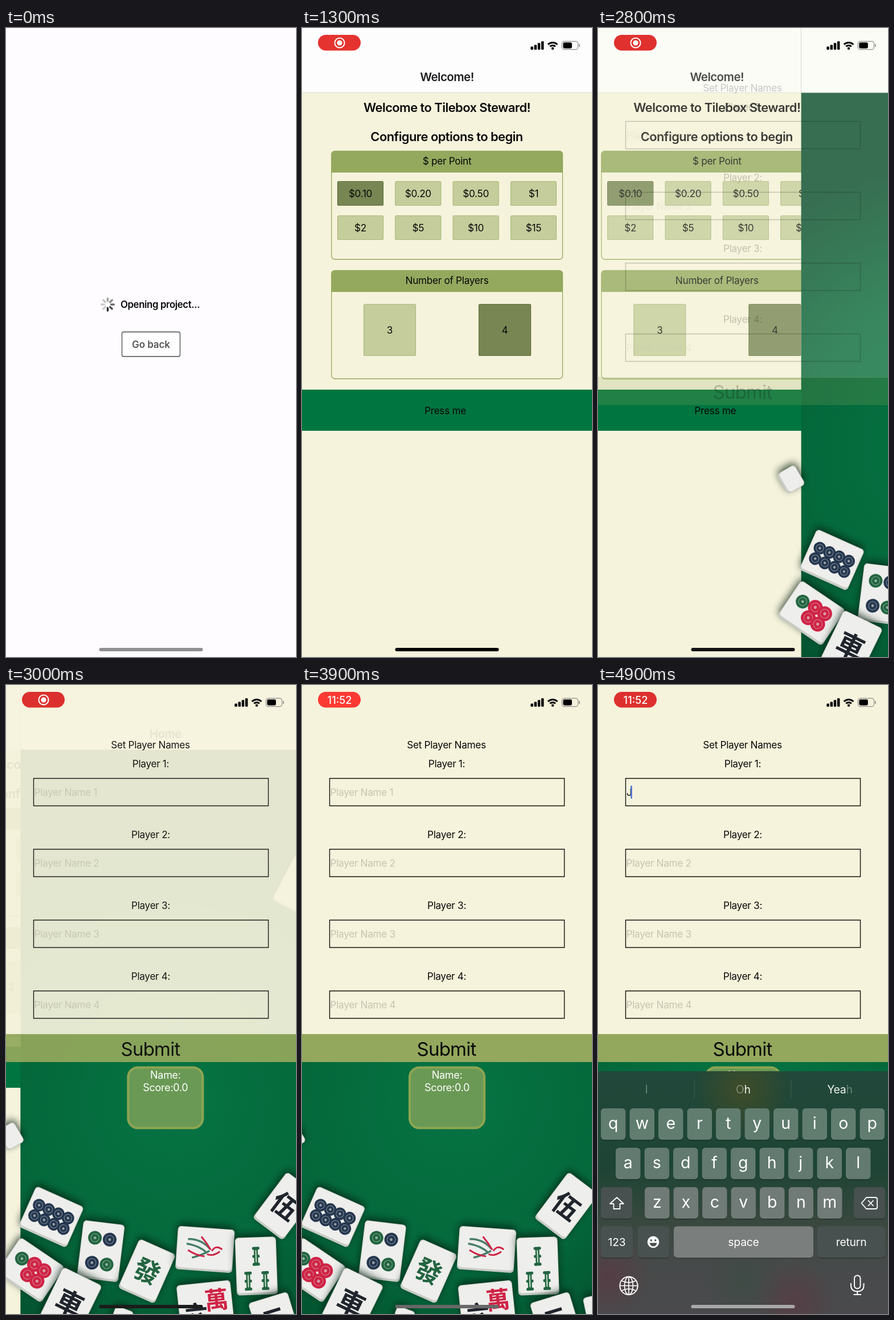
An HTML page with a canvas for the animation above (5000 ms loop, 509x1101 px).

```html
<!DOCTYPE html>
<html lang="en">
<head>
<meta charset="utf-8">
<title>Score keeper demo</title>
<style>
html, body { margin: 0; width: 100%; height: 100%; overflow: hidden; background: #fefcff; }
canvas { display: block; width: 509px; height: 1101px; }
</style>
</head>
<body>
<canvas id="stage"></canvas>
<script>
const W = 509, H = 1101, LOOP = 5000, STEP = 100;
const canvas = document.getElementById('stage');
const ctx = canvas.getContext('2d');
const ratio = window.devicePixelRatio || 1;
canvas.width = W * ratio;
canvas.height = H * ratio;

const CREAM = '#f6f3dc', OLIVE = '#94a95e', WHITE = '#fefdfe';
const AT = { app: 100, rate: 400, players: 1300, push: 2740, clock: 3500, keyboard: 3985, typed: 4850 };

const clamp = v => Math.max(0, Math.min(1, v));
const mix = (a, b, k) => a + (b - a) * k;

// Critically damped spring, 0 to 1
function spring(ms) {
  if (ms <= 0) return 0;
  const u = ms * 0.01826;
  return 1 - (1 + u) * Math.exp(-u);
}

// Linear interpolation through [time, value] points
function track(points, t) {
  for (let i = 1; i < points.length; i++) {
    const [t0, a] = points[i - 1], [t1, b] = points[i];
    if (t <= t1) return mix(a, b, clamp((t - t0) / (t1 - t0)));
  }
  return points[points.length - 1][1];
}

function box(x, y, w, h, r, fill, stroke, line = 1.3) {
  ctx.beginPath();
  ctx.roundRect(x, y, w, h, r);
  if (fill) { ctx.fillStyle = fill; ctx.fill(); }
  if (stroke) { ctx.strokeStyle = stroke; ctx.lineWidth = line; ctx.stroke(); }
}

function disc(x, y, r, fill) {
  ctx.beginPath();
  ctx.arc(x, y, r, 0, Math.PI * 2);
  ctx.fillStyle = fill;
  ctx.fill();
}

function ring(x, y, r, color, line) {
  ctx.beginPath();
  ctx.arc(x, y, r, 0, Math.PI * 2);
  ctx.strokeStyle = color;
  ctx.lineWidth = line;
  ctx.stroke();
}

function path(d, color, line) {
  const p = new Path2D(d);
  if (line) {
    ctx.strokeStyle = color;
    ctx.lineWidth = line;
    ctx.stroke(p);
  } else {
    ctx.fillStyle = color;
    ctx.fill(p);
  }
}

// y is the middle of the capital letters
function text(s, x, y, { size = 17.2, color = '#080808', weight = 400, align = 'center', gap = -0.3 } = {}) {
  ctx.font = `${weight} ${size}px Inter, sans-serif`;
  ctx.letterSpacing = gap + 'px';
  ctx.textAlign = align;
  ctx.fillStyle = color;
  ctx.fillText(s, x, y + size * 0.364);
}

function shifted(x, y, draw) {
  ctx.save();
  ctx.translate(x, y);
  draw();
  ctx.restore();
}

function loading(t) {
  ctx.fillStyle = '#fefcff';
  ctx.fillRect(0, 0, W, H);
  const lead = Math.floor(t / 125);
  ctx.lineCap = 'round';
  ctx.lineWidth = 3.4;
  for (let i = 0; i < 8; i++) {
    const a = Math.PI / 2 + (lead - i) * Math.PI / 4;
    const g = Math.min(200, 45 + i * 30);
    ctx.strokeStyle = `rgb(${g},${g},${g})`;
    ctx.beginPath();
    ctx.moveTo(178.5 + Math.cos(a) * 6, 484 + Math.sin(a) * 6);
    ctx.lineTo(178.5 + Math.cos(a) * 10.8, 484 + Math.sin(a) * 10.8);
    ctx.stroke();
  }
  ctx.lineCap = 'butt';
  text('Opening project...', 201, 484, { size: 16.8, weight: 600, align: 'left', gap: -0.38 });
  box(203.5, 532, 102, 43, 3, '#fff', '#4a4a4a', 1.3);
  text('Go back', 254.5, 553.5, { size: 17, weight: 600, color: '#555', gap: -0.1 });
}

function header(title) {
  ctx.fillStyle = WHITE;
  ctx.fillRect(0, 0, W, 113);
  ctx.fillStyle = '#dcdcd8';
  ctx.fillRect(0, 112.5, W, 1);
  text(title, 254.5, 86, { size: 20.4, weight: 600, color: '#1c1c1e', gap: -0.5 });
}

function panel(y, bar, label) {
  box(51.8, y + 0.5, 405.6, 189.5, 6, null, OLIVE);
  box(51.2, y, 406.8, bar, [6, 6, 0, 0], OLIVE);
  text(label, 254.5, y + 18);
}

function choice(x, y, w, h, label, on) {
  box(x + 0.5, y + 0.5, w - 1, h - 1, 2, on ? '#778653' : '#c4cd9b', on ? '#62713f' : '#abba7d', 1.2);
  text(label, x + w / 2, y + h / 2);
}

function welcome(t) {
  ctx.fillStyle = CREAM;
  ctx.fillRect(0, 0, W, H);
  header('Welcome!');
  const title = { size: 21.8, weight: 600, gap: -0.5 };
  text('Welcome to Tilebox Steward!', 254.5, 139, title);
  text('Configure options to begin', 254, 190, title);
  panel(215, 38, '$ per Point');
  ['$0.10', '$0.20', '$0.50', '$1', '$2', '$5', '$10', '$15'].forEach((s, i) =>
    choice(62 + (i % 4) * 101.3, i < 4 ? 268 : 328, 81, 43, s, i === 0 && t >= AT.rate));
  panel(424, 38, 'Number of Players');
  choice(108, 483, 92, 91, '3', false);
  choice(310, 483, 92, 91, '4', t >= AT.players);
  ctx.fillStyle = '#007540';
  ctx.fillRect(0, 633, W, 72);
  text('Press me', 251.5, 669.5);
}

const INK = '#20242c', BLUE = '#25374f', GREEN = '#226540', RED = '#cf2345';

function glyph(s, size, color, y = 0) {
  ctx.font = `700 ${size}px "Noto Sans CJK SC", "Noto Sans CJK", sans-serif`;
  ctx.letterSpacing = '0px';
  ctx.textAlign = 'center';
  ctx.fillStyle = color;
  ctx.fillText(s, 0, y + size * 0.37);
}

function coin(x, y, r, color) {
  disc(x, y, r, color);
  ring(x, y, r * 0.6, 'rgba(225,230,225,.5)', 1);
  disc(x, y, r * 0.2, 'rgba(225,230,225,.6)');
}

function stick(x, y) {
  box(x - 3.5, y - 15, 7, 30, 2, GREEN);
  for (const k of [-14, 0, 14]) box(x - 6.5, y + k - 2.5, 13, 5, 2, GREEN);
  box(x - 1, y - 11, 2, 22, 1, '#cfe0d0');
}

const FACES = {
  eight() {
    for (let i = 0; i < 8; i++) coin((i % 4 - 1.5) * 18.5, i < 4 ? -10 : 10, 11, BLUE);
  },
  four() {
    coin(-13, -22, 12, GREEN); coin(13, -22, 12, BLUE);
    coin(-13, 22, 12, BLUE); coin(13, 22, 12, GREEN);
  },
  fortune() { glyph('發', 46, GREEN); },
  bird() {
    path('M-31 -16 Q-8 -18 8 -2 M-33 -8 Q-10 -6 4 6 M-22 16 Q-4 10 8 2', '#467e68', 3.5);
    path('M-8 -22 Q2 -12 10 0 M4 8 Q14 12 26 2 M12 2 Q18 -10 30 -2 M-30 3 Q-14 12 0 12', RED, 3);
  },
  bamboo() { stick(0, -17); stick(-15, 26); stick(15, 26); },
  five() { glyph('伍', 47, INK); },
  red() {
    coin(-24, -8, 12, GREEN);
    for (const [x, y] of [[0, -12], [20, -12], [0, 10], [20, 10]]) coin(x, y, 13, RED);
  },
  wind() { glyph('車', 48, INK, 3); },
  wan() {
    shifted(-17, 0, () => glyph('六', 40, INK));
    shifted(20, 0, () => glyph('萬', 42, RED, -20));
  },
  two() { glyph('二', 42, INK, -8); },
  blank() {}
};

// x, y, width, height, degrees, face
const TILES = [
  [54, 931, 92, 78, 24, 'eight'], [141, 991, 73, 101, 7, 'four'],
  [18, 1024, 94, 76, 34, 'red'], [88, 1079, 76, 98, 26, 'wind'],
  [222, 1026, 70, 94, 24, 'fortune'], [324, 988, 100, 76, 4, 'bird'],
  [414, 1017, 72, 101, -2, 'bamboo'], [464, 912, 66, 101, 37, 'five'],
  [326, 1098, 95, 104, -6, 'wan'], [447, 1115, 72, 90, -17, 'two'],
  [-18, 790, 40, 36, 60, 'blank'], [178, 1108, 34, 34, 20, 'blank'],
  [528, 1096, 60, 60, -12, 'blank'], [492, 350, 66, 92, 28, 'blank']
];

function tile([x, y, w, h, deg, face]) {
  ctx.save();
  ctx.translate(x, y);
  ctx.rotate(deg * Math.PI / 180);
  ctx.shadowColor = 'rgba(0,28,14,.75)';
  ctx.shadowBlur = 14 * ratio;
  ctx.shadowOffsetY = -5 * ratio;
  box(-w / 2, -h / 2, w, h, 6, '#c9ccc6');
  ctx.shadowColor = 'transparent';
  box(-w / 2 + 1, -h / 2 + 1, w - 2, h - 5, 6, '#eeeeec');
  FACES[face]();
  ctx.restore();
}

function game() {
  const felt = ctx.createRadialGradient(270, 720, 20, 270, 760, 520);
  felt.addColorStop(0, '#067343');
  felt.addColorStop(0.5, '#04683b');
  felt.addColorStop(1, '#02492a');
  ctx.fillStyle = felt;
  ctx.fillRect(0, 0, W, H);
  TILES.forEach(tile);
  box(189, 669.5, 131, 106, 17, '#6a9955', '#8da551', 4);
  const label = { size: 18, color: '#fff' };
  text('Name:', 254.5, 682.5, label);
  text('Score:0.0', 254.5, 704.5, label);
  header('Home');
}

function names(t) {
  ctx.fillStyle = CREAM;
  ctx.fillRect(0, 0, W, 612);
  ctx.fillStyle = '#93a85c';
  ctx.fillRect(0, 611, W, 49);
  text('Set Player Names', 253.5, 104.5);
  const typed = t >= AT.typed;
  for (let i = 0; i < 4; i++) {
    const y = 138 + i * 124;
    text(`Player ${i + 1}:`, 254, y);
    box(48.5, y + 25.5, 412, 48, 0, null, '#10100e', 1.4);
    if (i === 0 && typed) text('J', 50, y + 50, { align: 'left' });
    else text(`Player Name ${i + 1}`, 49.5, y + 50, { align: 'left', color: '#c6c4b1' });
  }
  if (t >= AT.keyboard) box(typed ? 57.3 : 49.3, 176, 2.6, 23, 1.3, '#4c78cf');
  text('Submit', 253.5, 636.5, { size: 33, gap: -0.8 });
}

function key(x, y, w, label, dark, fill) {
  box(x, y + 1.5, w, 55, 6, 'rgba(0,0,0,.28)');
  box(x, y, w, 55, 6, fill || (dark ? '#48514f' : y < 800 ? '#617d70' : y < 870 ? '#627a6f' : '#707a76'));
  if (label) text(label, x + w / 2, y + 27.5, { size: 19.3, color: '#fff', gap: -0.2 });
}

function letters(s, x, y) {
  [...s].forEach((c, i) => {
    const left = x + i * 50.5;
    key(left, y, 43.5);
    const caps = c < 'a';
    text(c, left + 21.8, y + (caps ? 28 : 25.5), { size: caps ? 27 : 28.5, color: '#fff', gap: 0 });
  });
}

function keyboard(typed) {
  const back = ctx.createLinearGradient(0, 676, 0, H);
  back.addColorStop(0, '#21483a');
  back.addColorStop(0.4, '#1d4434');
  back.addColorStop(0.62, '#39483f');
  back.addColorStop(0.8, '#474a4a');
  back.addColorStop(1, '#4a4a4c');
  ctx.fillStyle = back;
  ctx.fillRect(0, 676, W, 440);

  // Blurred colours from the table underneath
  const glow = (x, y, r, rgb, a) => {
    const g = ctx.createRadialGradient(x, y, 0, x, y, r);
    g.addColorStop(0, `rgba(${rgb},${a})`);
    g.addColorStop(1, `rgba(${rgb},0)`);
    ctx.fillStyle = g;
    ctx.fillRect(x - r, Math.max(676, y - r), r * 2, r * 2);
  };
  glow(254, 708, 85, '74,78,34', 0.75);
  glow(20, 1035, 75, '98,48,62', 0.5);
  glow(345, 1080, 75, '98,48,62', 0.45);
  glow(254, 1045, 70, '50,76,62', 0.4);

  let ink = '#eef1ef';
  if (typed) {
    ink = ctx.createLinearGradient(0, 0, W, 0);
    [[0, 0.35], [254 / W, 0.35], [256 / W, 1], [434 / W, 1], [436 / W, 0.35], [1, 0.35]]
      .forEach(([p, a]) => ink.addColorStop(p, `rgba(238,241,239,${a})`));
  }
  ['I', 'Oh', 'Yeah'].forEach((s, i) => text(s, 85 + i * 169.7, 707.5, { size: 19.4, color: ink }));
  ctx.fillStyle = 'rgba(255,255,255,.14)';
  ctx.fillRect(168.5, 691, 1, 33);
  ctx.fillRect(338.5, 691, 1, 33);

  const fit = s => typed ? s.toLowerCase() : s;
  letters(fit('QWERTYUIOP'), 5, 741);
  letters(fit('ASDFGHJKL'), 31, 810);
  letters(fit('ZXCVBNM'), 82, 879);

  key(5, 879, 55, '', true, typed ? null : '#dcdbdf');
  const arrow = 'M33 897 L45 908 H38.5 V917 H27.5 V908 H21 Z';
  ctx.lineJoin = 'round';
  if (typed) path(arrow, '#fff', 1.8);
  else path(arrow, '#000');

  key(449, 879, 55, '', true);
  path('M471 897 H487 Q490 897 490 900 V914 Q490 917 487 917 H471 L462.5 907 Z M474 902 L483.5 912 M483.5 902 L474 912', '#fff', 1.8);
  ctx.lineJoin = 'miter';

  key(5, 947.5, 56, '123', true);
  key(69.5, 947.5, 56, '', true);
  disc(97, 975, 10.3, '#fff');
  disc(93.3, 972, 1.7, '#48514f');
  disc(100.7, 972, 1.7, '#48514f');
  path('M90.5 976.5 H103.5 Q102 982.5 97 982.5 Q92 982.5 90.5 976.5 Z', '#48514f');
  key(133, 947.5, 245, 'space', false, '#7a7e7d');
  key(385, 947.5, 119, 'return', true);

  ring(54, 1051.5, 15.7, '#fff', 1.9);
  path('M54 1036 V1067 M38.5 1051.5 H69.5 M42 1043 Q54 1049 66 1043 M42 1060 Q54 1054 66 1060', '#fff', 1.7);
  ctx.beginPath();
  ctx.ellipse(54, 1051.5, 7.5, 15.5, 0, 0, Math.PI * 2);
  ctx.stroke();
  box(450, 1033.5, 10.5, 23, 5.2, null, '#fff', 1.9);
  path('M444 1047 V1051 Q444 1061.5 455.2 1061.5 Q466.5 1061.5 466.5 1051 V1047 M455.2 1061.5 V1067 M448.5 1067 H462', '#fff', 1.9);
}

function statusBar(t) {
  const dim = Math.pow(0.5 + 0.5 * Math.cos(Math.PI * (t - 1000) / 1000), 1.5);
  box(28, 12, 75, 27.5, 13.7, `rgb(${mix(251, 220, dim)},${mix(58, 48, dim)},${mix(51, 46, dim)})`);
  if (t >= AT.clock) {
    text('11:52', 66, 26, { size: 18.2, weight: 500, color: '#fff', gap: 0 });
  } else {
    ring(66, 26, 8.6, '#fff', 2);
    disc(66, 26, 4.6, '#fff');
  }
  for (let i = 0; i < 4; i++) {
    const h = 5.5 + i * 3.1;
    box(401.3 + i * 6.2, 38 - h, 4.5, h, 1.2, i === 3 && t < 900 ? '#cfcfcf' : '#000');
  }
  const cx = 440, cy = 37;
  disc(cx, cy - 1.2, 2.2, '#000');
  for (const r of [6.7, 11.7]) {
    ctx.beginPath();
    ctx.arc(cx, cy + 0.3, r, -Math.PI * 0.75, -Math.PI * 0.25);
    ctx.strokeStyle = '#000';
    ctx.lineWidth = 3;
    ctx.stroke();
  }
  box(456.3, 23.3, 28.2, 14.4, 4, null, '#8f8f8a', 1.2);
  box(458.3, 25.3, 15.5, 10.4, 2.4, '#000');
  box(486, 28, 1.8, 5, 1, '#8f8f8a');
}

const BAR_LEVEL = [[0, 144], [500, 116], [1000, 0], [1900, 0], [2900, 20], [3900, 104], [4300, 146], [4900, 168]];

function homeBar(t) {
  const g = track(BAR_LEVEL, t);
  box(163.5, 1085, 182, 6, 3, `rgb(${g},${g},${g})`);
}

function draw(t) {
  ctx.setTransform(ratio, 0, 0, ratio, 0, 0);
  if (t < AT.app) {
    loading(t);
    homeBar(t);
    return;
  }
  const p = spring(t - AT.push);
  shifted(-0.3 * W * p, 0, () => welcome(t));
  if (p > 0) {
    // Parallax layer moves less than the incoming page
    const x = W * (1 - p);
    ctx.fillStyle = CREAM;
    shifted(x < 0.5 ? 0 : x, 0, game);
    ctx.globalAlpha = clamp((t - AT.push) / 280);
    names(t);
    ctx.globalAlpha = 1;
  }
  if (t > AT.keyboard) {
    const left = 425 * (1 - spring(t - AT.keyboard));
    shifted(0, left, () => keyboard(t >= AT.typed));
  }
  statusBar(t);
  homeBar(t);
}

const start = performance.now();
function tick() {
  const t = Math.max(0, performance.now() - start) % LOOP;
  draw(Math.floor(t / STEP) * STEP);
  requestAnimationFrame(tick);
}
tick();
</script>
</body>
</html>
```
